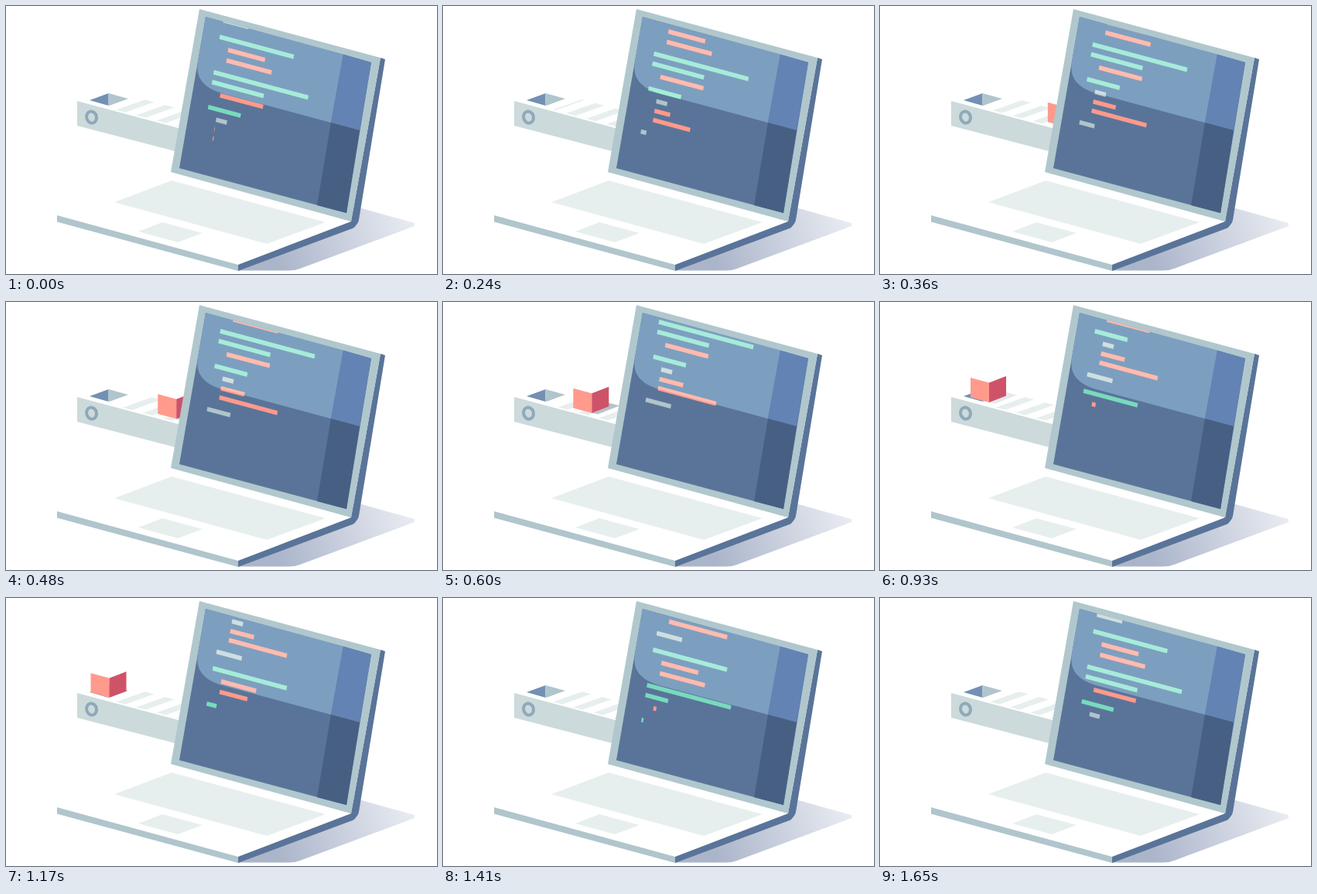
These frames come from a looping animation (557 by 347 pixels, 1680 ms). An HTML page with a canvas:

```html
<!DOCTYPE html>
<html lang="en">
<head>
<meta charset="utf-8">
<title>Laptop and conveyor</title>
<style>
  html, body { margin: 0; height: 100%; overflow: hidden; background: #fff; }
  canvas { display: block; }
</style>
</head>
<body>
<canvas id="stage" width="557" height="347"></canvas>
<script>
const ctx = document.getElementById('stage').getContext('2d');
const LOOP = 1680, STEP = 30;
const SLOPE = 0.268;   // every long edge falls to the right
const LEAN = 0.177;    // the screen leans back

// Code lines: indent, row at birth, width, colour, birth time, typing time
const LINES = [
  [22.8, 119.9, 95.5, 'green', 653, 420],
  [36, 112.8, 47.5, 'red', 859, 360],
  [36.3, 118.1, 58, 'red', 938, 400],
  [23, 121.9, 122, 'green', 1089, 405],
  [23.3, 118.7, 66.5, 'green', 1249, 350],
  [36, 121.3, 55.5, 'red', 1360, 316],
  [23.8, 139.2, 42, 'green', 1364, 315],
  [36.3, 138.8, 14, 'grey', 1500, 180],
  [36.2, 137, 30.5, 'red', 1642, 457],
  [36.4, 148.3, 75, 'red', 1648, 458],
  [23.8, 153, 32.5, 'grey', 103, 455]
];
const DARK = { green: '#78dabd', red: '#ff9a8a', grey: '#b0c5cb' };
const LIGHT = { green: '#a8ebd9', red: '#ffbbb0', grey: '#cfdee0' };

const screen = new Path2D('M258 14L472 73L440 268L224 210Z');
const glow = new Path2D('M258 14L436 62.5L420 151L281 113.5C258 107 244 95 248 72Z');
const belt = new Path2D('M141.5 134.4L179.5 121L240 137.2V160.8Z');
const aboveHole = new Path2D('M108 0V122L133.5 129L158 120V0Z');

const clamp = x => Math.min(1, Math.max(0, x));
const smooth = x => x * x * (3 - 2 * x);
const half = x => Math.pow(2 * x, 2.25) / 2;
const easeInOut = x => x < 0.5 ? half(x) : 1 - half(1 - x);

function fill(color, path) {
  ctx.fillStyle = color;
  ctx.fill(typeof path === 'string' ? new Path2D(path) : path);
}

function clipped(path, draw) {
  ctx.save();
  if (path) ctx.clip(path);
  draw();
  ctx.restore();
}

function drawLines(t, palette) {
  ctx.transform(1, SLOPE, -LEAN, 1, 257, 14);
  for (const [indent, row, width, color, birth, duration] of LINES) {
    const age = (t - birth + LOOP) % LOOP;
    ctx.fillStyle = palette[color];
    ctx.fillRect(indent, row - age / 10, width * smooth(clamp(age / duration)), 5.5);
  }
}

function drawConveyor(t) {
  const travel = 130 * easeInOut(clamp(t / 1150));
  const left = 130 - travel;

  fill('#ccdadb', 'M92 123L230 160V191L92 155Z');
  ctx.strokeStyle = '#8fa9ba';
  ctx.lineWidth = 4;
  ctx.beginPath();
  ctx.ellipse(110.5, 144, 6.4, 7.6, -0.25, 0, Math.PI * 2);
  ctx.stroke();

  fill('#7390b3', 'M108 122L132.5 113V129Z');
  fill('#b0c5cc', 'M132.5 113L158 120L133.5 129H132.5Z');

  clipped(belt, () => {
    for (let i = 0; i < 10; i++) {
      const x = 142 + 26 * i - travel;
      const y = 134.5 + SLOPE * (x - 142);
      fill('#e7efee', `M${x} ${y}l12 3.2l38 -13.5l-12 -3.2Z`);
    }
  });

  const fall = clamp((t - 1125) / 260);
  if (fall === 1) return;
  clipped(fall > 0 && aboveHole, () => {
    ctx.translate(109.5 + left, 95.9 + left * SLOPE + 44 * fall * fall);
    ctx.globalAlpha = clamp(left / 20);
    fill('#b8c3cb', 'M24 32L46 19L60 22.5L32 33.5Z');
    ctx.globalAlpha = 1;
    fill('#fff', 'M0 0L22 -8.5L46 -2L24 6.5Z');
    fill('#ff9a8d', 'M0 0L24 6.5V32L0 25.5Z');
    fill('#cf5368', 'M24 6.5L46 -2V23.5L24 32Z');
  });
}

function drawLaptop(t) {
  const shade = ctx.createLinearGradient(350, 330, 520, 270);
  shade.addColorStop(0, '#abb5ca');
  shade.addColorStop(1, '#e8ebf1');
  fill(shade, 'M456 261L528 281V285L380 340Q374 342.5 366 342.5H300Z');

  fill('#fff', 'M66 271L213 215L447 279L300 335Z');
  fill('#b0c5cc', 'M66 271L300 335V343L66 279.5Z');
  fill('#5a7499', 'M484 67L490 69L456 277Q455 282 449 287.5L300 343V335L446 279Z');
  fill('#e7efee', 'M214 226L413 280L337 308L140 254Z');
  fill('#e7efee', 'M202 280L254 294L222 306L171 292Z');

  fill('#b0c7cd', 'M250 4L484 67L446 279L213 215Z');
  fill('#5a7499', screen);
  fill('#7c9fc0', glow);
  fill('#6383b5', 'M436 62.5L472 73L457 161L420 151Z');
  fill('#465f83', 'M420 151L457 161L440 268L402 258Z');

  clipped(screen, () => drawLines(t, DARK));
  clipped(glow, () => drawLines(t, LIGHT));
}

function render() {
  const t = Math.floor(performance.now() % LOOP / STEP) * STEP;
  fill('#fff', 'M0 0H557V347H0Z');
  drawConveyor(t);
  drawLaptop(t);
  requestAnimationFrame(render);
}
render();
</script>
</body>
</html>
```
